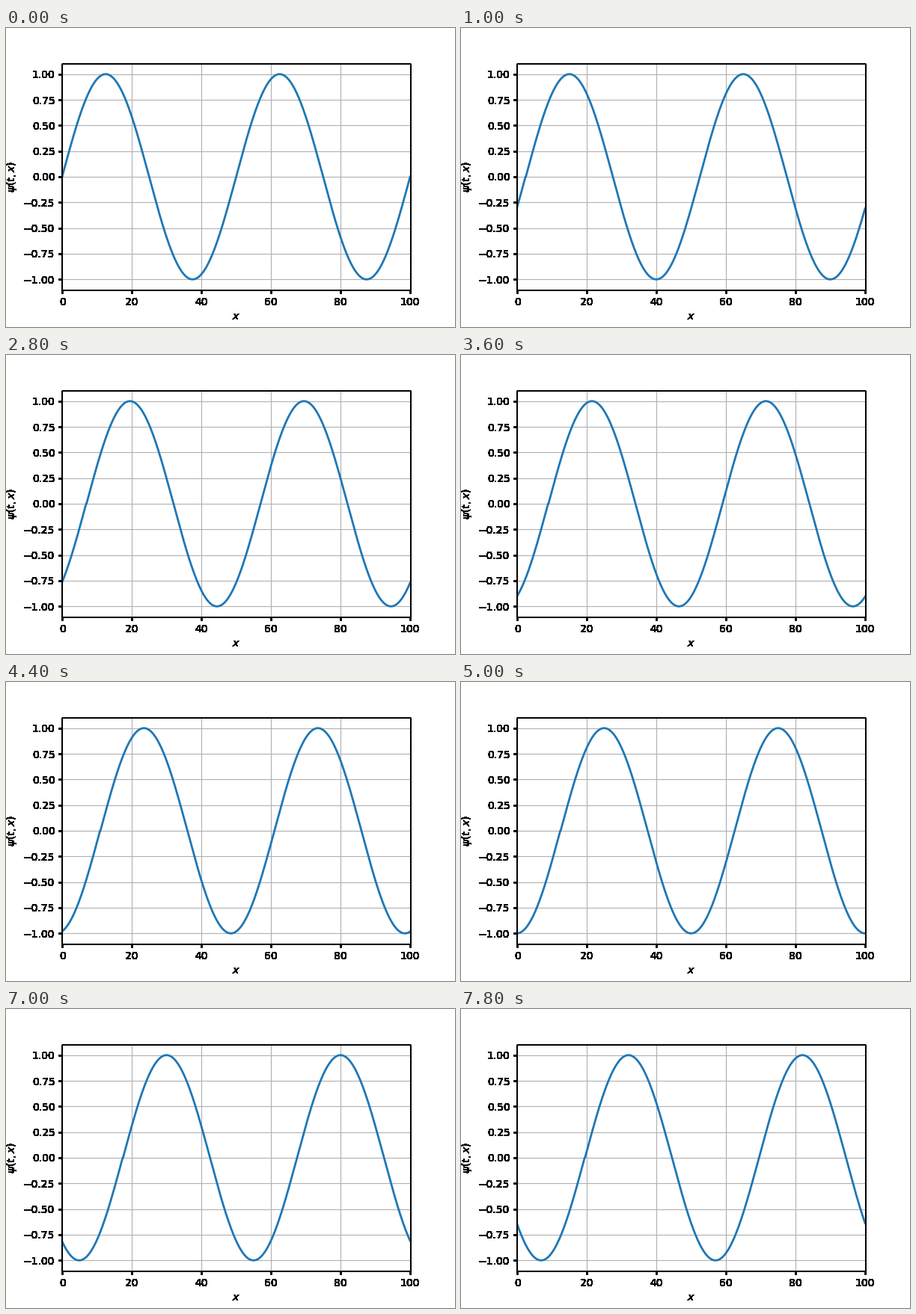
Animation, 600 px wide and 400 px high, one loop 8000 ms. Source, as a matplotlib script:

```python
import matplotlib.pyplot as plt
import numpy as np
from matplotlib.animation import FuncAnimation

FRAMES = 40
INTERVAL = 200
SAMPLES = 1001
STEP = 5          # samples the wave travels per frame
WEAR = 60         # how often the frame and labels are overprinted

plt.rcParams.update({"font.family": "DejaVu Sans", "font.size": 10})

fig = plt.figure(figsize=(6, 4), dpi=100, facecolor="white")
ax = fig.add_axes([0.125, 0.125, 0.775, 0.755])
ax.set_xlim(0, 100)
ax.set_ylim(-1.1, 1.1)
ax.set_yticks(np.arange(-1, 1.01, 0.25))
ax.set_xlabel(r"$x$")
ax.set_ylabel(r"$\psi(t,x)$")


def overprint(times):
    """Lay the black decorations under the axes as if printed many times."""
    fig.canvas.draw()
    ink = np.asarray(fig.canvas.buffer_rgba())[..., :3] / 255
    fig.figimage(ink ** times, origin="upper", zorder=-1)


overprint(WEAR)
ax.grid(True, color="#b0b0b0", linewidth=0.8)

x = np.linspace(0, 100, SAMPLES)
psi = np.sin(4 * np.pi * x / 100)
wave, = ax.plot(x, psi, color="#1f77b4", lw=2)


def update(i):
    wave.set_ydata(np.roll(psi, STEP * i))
    return wave,


anim = FuncAnimation(fig, update, frames=FRAMES, interval=INTERVAL,
                     init_func=lambda: update(0), repeat=True,
                     repeat_delay=0, blit=False)
plt.show()
```
